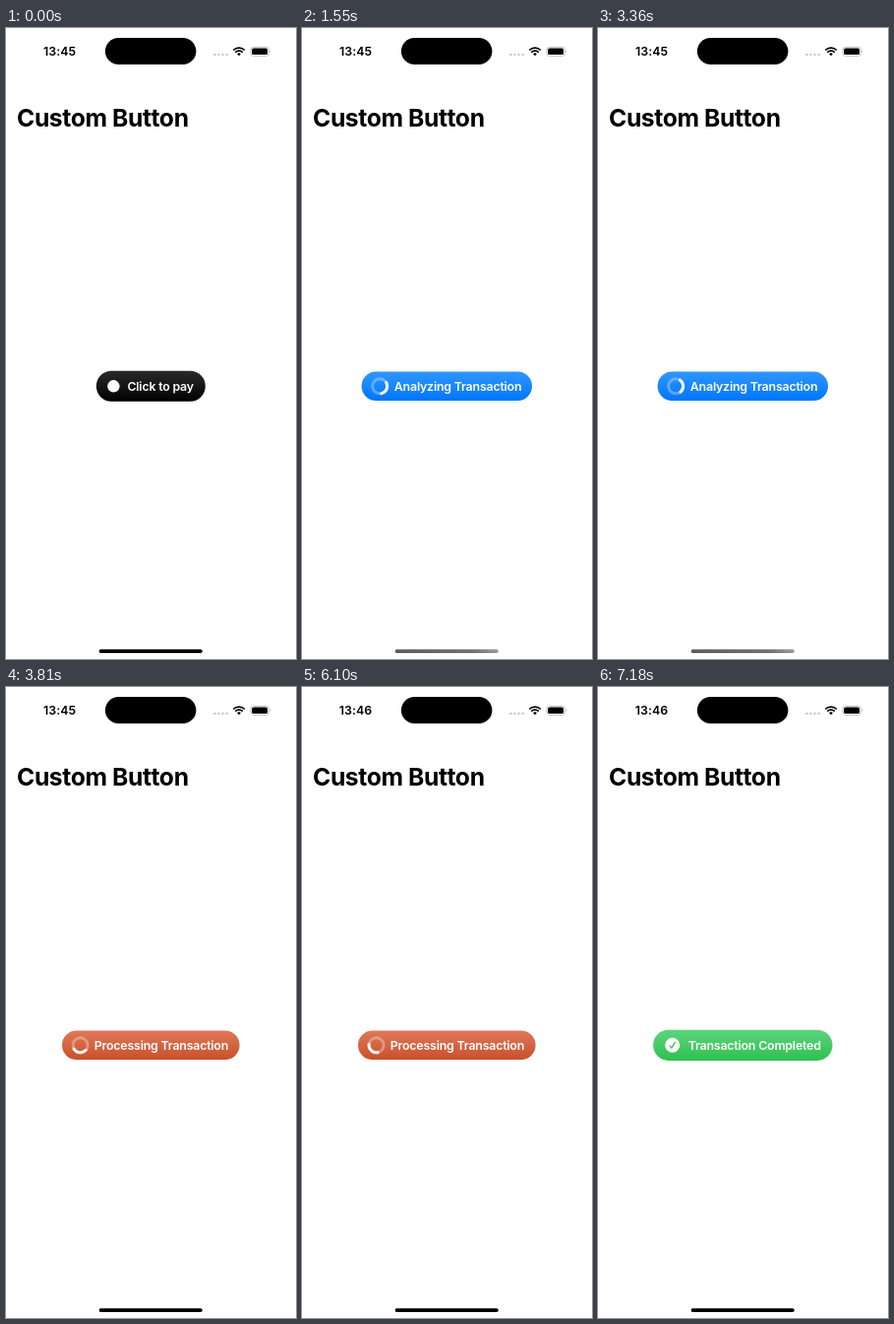
Write an HTML page that moves like this. It is 295 px wide and 640 px high and loops after 8000 ms.

```html
<!DOCTYPE html>
<html lang="en">
<head>
<meta charset="utf-8">
<title>Custom Button</title>
<style>
  html, body { margin: 0; width: 100%; height: 100%; overflow: hidden; background: #fff; }
  svg { display: block; width: 100%; height: 100%; }
  text { font-family: Inter, Roboto, sans-serif; font-optical-sizing: none; font-weight: 600; font-size: 12.4px; letter-spacing: -.21px; }
  .title { font-weight: 700; font-size: 24.7px; letter-spacing: -.38px; }
  .clock { letter-spacing: .05px; }
  .labels { fill: #fff; }
</style>
</head>
<body>
<svg viewBox="0 0 295 640">
  <defs>
    <linearGradient id="fill" x2="0" y2="1">
      <stop id="top"/><stop id="bottom" offset="1"/>
    </linearGradient>
    <linearGradient id="grey">
      <stop stop-color="#5c5c5c"/><stop offset=".75" stop-color="#707070"/><stop offset="1" stop-color="#999"/>
    </linearGradient>
    <clipPath id="clip"><rect class="pill"/></clipPath>
  </defs>
  <rect width="295" height="640" fill="#fff"/>

  <text class="clock" id="clock" x="54.5" y="28.4" text-anchor="middle"></text>
  <rect x="100.9" y="9.9" width="92.5" height="27.2" rx="13.6"/>
  <g fill="#c4c4c4">
    <circle cx="212.4" cy="26.9" r="1.2"/><circle cx="216.5" cy="26.9" r="1.2"/>
    <circle cx="220.5" cy="26.9" r="1.2"/><circle cx="224.5" cy="26.9" r="1.2"/>
  </g>
  <g fill="none" stroke="#000" stroke-width="1.7">
    <path d="M231.2 22.5a8.3 8.3 0 0 1 11.6 0M233.2 24.7a5.4 5.4 0 0 1 7.6 0"/>
    <path d="M235.1 26.2a2.8 2.8 0 0 1 3.8 0L237 28.2z" fill="#000" stroke="none"/>
  </g>
  <rect x="248.7" y="19.3" width="18.9" height="9.1" rx="3" fill="none" stroke="#b4b4b4" stroke-width=".8"/>
  <rect x="250.1" y="20.6" width="16" height="6.5" rx="1.9"/>
  <path d="M268.7 22.3q1.6 1.5 0 3z" fill="#b4b4b4"/>

  <text class="title" x="11" y="100">Custom Button</text>

  <rect class="pill" fill="url(#fill)"/>
  <g clip-path="url(#clip)">
    <g class="labels" id="labels"></g>
    <g id="dot"><circle r="6.2" fill="#fff"/></g>
    <g id="spinner" fill="none" stroke="#fff" stroke-width="3">
      <circle r="7.5" stroke-opacity=".3"/>
      <circle id="arc" r="7.5" pathLength="100" stroke-dasharray="30 70" stroke-linecap="round"/>
    </g>
    <g id="check">
      <circle r="7.5" fill="#fff"/>
      <path d="M-2.7 .6L-.8 2.9L2.8-2.9" fill="none" stroke="#35c658" stroke-width="1.3" stroke-linecap="round" stroke-linejoin="round"/>
    </g>
  </g>
  <rect id="home" x="94.6" y="630.2" width="105.2" height="3.8" rx="1.9"/>
</svg>
<script>
const LOOP = 8000, FADE = 230, CX = 147.3, CY = 363.3;
const SPIN_START = 450, SPIN = 613, EXTRA_DELAY = 1000, EXTRA_SPIN = 833;
const MINUTE = 4200;

// icon and text are offsets from the left edge of the pill
const states = [
  { at: 0, label: 'Click to pay', w: 111, h: 31, icon: 17.6, text: 31.6, top: [42, 42, 43], bottom: [0, 0, 0], mark: 'dot' },
  { at: 500, label: 'Analyzing Transaction', w: 173.4, h: 29.5, icon: 18.6, text: 33.2, top: [48, 150, 255], bottom: [0, 118, 252], mark: 'spinner' },
  { at: 3570, label: 'Processing Transaction', w: 180.6, h: 29.5, icon: 18.6, text: 32.8, top: [223, 121, 89], bottom: [201, 80, 43], mark: 'spinner' },
  { at: 6650, label: 'Transaction Completed', w: 182.4, h: 31.2, icon: 19.6, text: 35.6, top: [92, 212, 124], bottom: [46, 193, 80], mark: 'check' }
];

const $ = id => document.getElementById(id);
const set = (el, attrs) => { for (const k in attrs) el.setAttribute(k, attrs[k]); };
const mix = (a, b, p) => a + (b - a) * p;
const mixColor = (a, b, p) => `rgb(${a.map((v, i) => Math.round(mix(v, b[i], p)))})`;
const easeOut = p => 1 - (1 - p) ** 3;

const pills = document.querySelectorAll('.pill');
const labels = states.map(s => {
  const el = document.createElementNS('http://www.w3.org/2000/svg', 'text');
  el.textContent = s.label;
  return $('labels').appendChild(el);
});

function spinAngle(t) {
  const age = Math.max(0, t - SPIN_START);
  const extra = Math.max(0, age % (EXTRA_DELAY + EXTRA_SPIN) - EXTRA_DELAY);
  return 360 * (age / SPIN + extra / EXTRA_SPIN);
}

function render(t) {
  const n = states.findLastIndex(s => t >= s.at);
  const to = states[n], from = states[Math.max(0, n - 1)];
  const p = n ? easeOut(Math.min(1, (t - to.at) / FADE)) : 1;
  const w = mix(from.w, to.w, p), h = mix(from.h, to.h, p), left = CX - w / 2;

  pills.forEach(el => set(el, { x: left, y: CY - h / 2, width: w, height: h, rx: h / 2 }));
  for (const end of ['top', 'bottom']) set($(end), { 'stop-color': mixColor(from[end], to[end], p) });

  labels.forEach((el, i) => set(el, {
    x: left + mix(from.text, to.text, p), y: 368,
    opacity: i === n ? p : i === n - 1 ? 1 - p : 0
  }));

  const iconX = left + mix(from.icon, to.icon, p);
  for (const mark of ['dot', 'spinner', 'check']) {
    const shown = mix(+(from.mark === mark), +(to.mark === mark), p);
    set($(mark), { transform: `translate(${iconX} ${CY}) scale(${mix(.6, 1, shown)})`, opacity: shown });
  }
  set($('arc'), { transform: `rotate(${spinAngle(t) % 360})` });

  set($('home'), { fill: n === 1 ? 'url(#grey)' : '#000' });
  $('clock').textContent = t < MINUTE ? '13:45' : '13:46';
}

const start = performance.now();
function tick() {
  render((performance.now() - start) % LOOP);
  requestAnimationFrame(tick);
}
tick();
</script>
</body>
</html>
```
